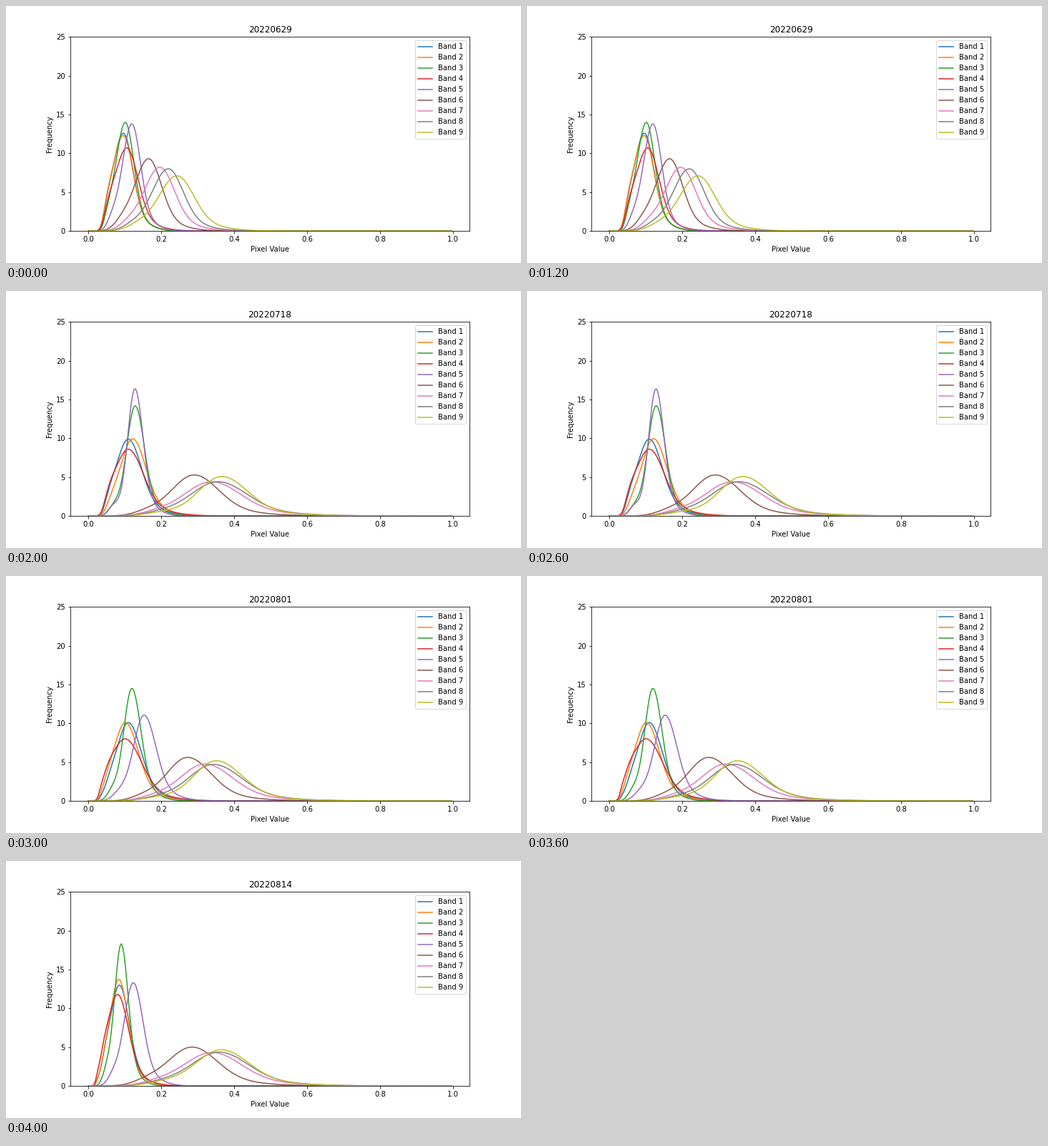
A matplotlib script for the animation above (5 s loop, 720 by 360 pixels).

```python
import matplotlib.pyplot as plt
import numpy as np
from matplotlib.animation import FuncAnimation

plt.rcParams["font.family"] = "DejaVu Sans"
BINS = 256
MAIN_SHARE = 0.92  # part of the unit area under the main peak
TRAIL = 0.18       # part of the right flank that falls off half as fast
x = np.arange(BINS) / BINS


def bump(height, center, left, right):
    """Bell with its own width on each side."""
    width = np.where(x < center, left, right)
    return height * np.exp(-0.5 * ((x - center) / width) ** 2)


def density(center, height, skew, onset):
    """Histogram curve: unit area, so the height of the peak fixes its width."""
    left = MAIN_SHARE / (np.sqrt(np.pi / 2) * height * (1 + 1.074 * skew))
    right = 0.91 * skew * left
    core = bump((1 - TRAIL) * height, center, left, right)
    trail = bump(TRAIL * height, center, left, 2 * right)
    foot = bump(0.08 * height, 0.55 * center, 0.12 * center, 0.12 * center)
    fade_in = 1 / (1 + np.exp(8 * (1 - x / onset)))
    return (core + trail + foot) * fade_in


# Date, skew, onset, then the peak position and peak height of bands 1 to 9.
DATES = [
    ("20220629", 0.95, 0.036,
     [.0955, .095, .101, .105, .119, .165, .196, .219, .243],
     [12.6, 12.3, 14, 10.7, 13.8, 9.3, 8.2, 8, 7.1]),
    ("20220718", 1.12, 0.038,
     [.109, .121, .128, .109, .1275, .29, .337, .355, .366],
     [9.9, 9.95, 14.2, 8.6, 16.4, 5.27, 4.4, 4.4, 5.07]),
    ("20220801", 1.15, 0.028,
     [.109, .101, .119, .1, .1525, .272, .319, .343, .351],
     [10.1, 10.1, 14.5, 8, 11.05, 5.6, 4.75, 4.7, 5.17]),
    ("20220814", 1.08, 0.019,
     [.0845, .083, .0897, .0797, .123, .284, .339, .3585, .365],
     [13, 13.75, 18.3, 11.8, 13.3, 5, 4.3, 4.35, 4.65]),
]
SCHEDULE = [0, 0, 1, 2, 3]  # the first date stays for two steps

fig, ax = plt.subplots(figsize=(10, 5), dpi=72)
fig.subplots_adjust(left=.125, right=.9, bottom=.125, top=.88)
lines = [ax.plot(x, 0 * x, label=f"Band {band}")[0] for band in range(1, 10)]
margin = 0.05 * x[-1]
ax.set(xlim=(-margin, x[-1] + margin), ylim=(0, 25),
       xlabel="Pixel Value", ylabel="Frequency")
title = ax.set_title("")
ax.legend(loc="upper right")


def update(frame):
    date, skew, onset, centers, heights = DATES[SCHEDULE[frame]]
    title.set_text(date)
    for line, center, height in zip(lines, centers, heights):
        line.set_ydata(density(center, height, skew, onset))
    return [title, *lines]


anim = FuncAnimation(fig, update, frames=len(SCHEDULE), interval=1000,
                     repeat=True, repeat_delay=0, blit=False)
plt.show()
```
